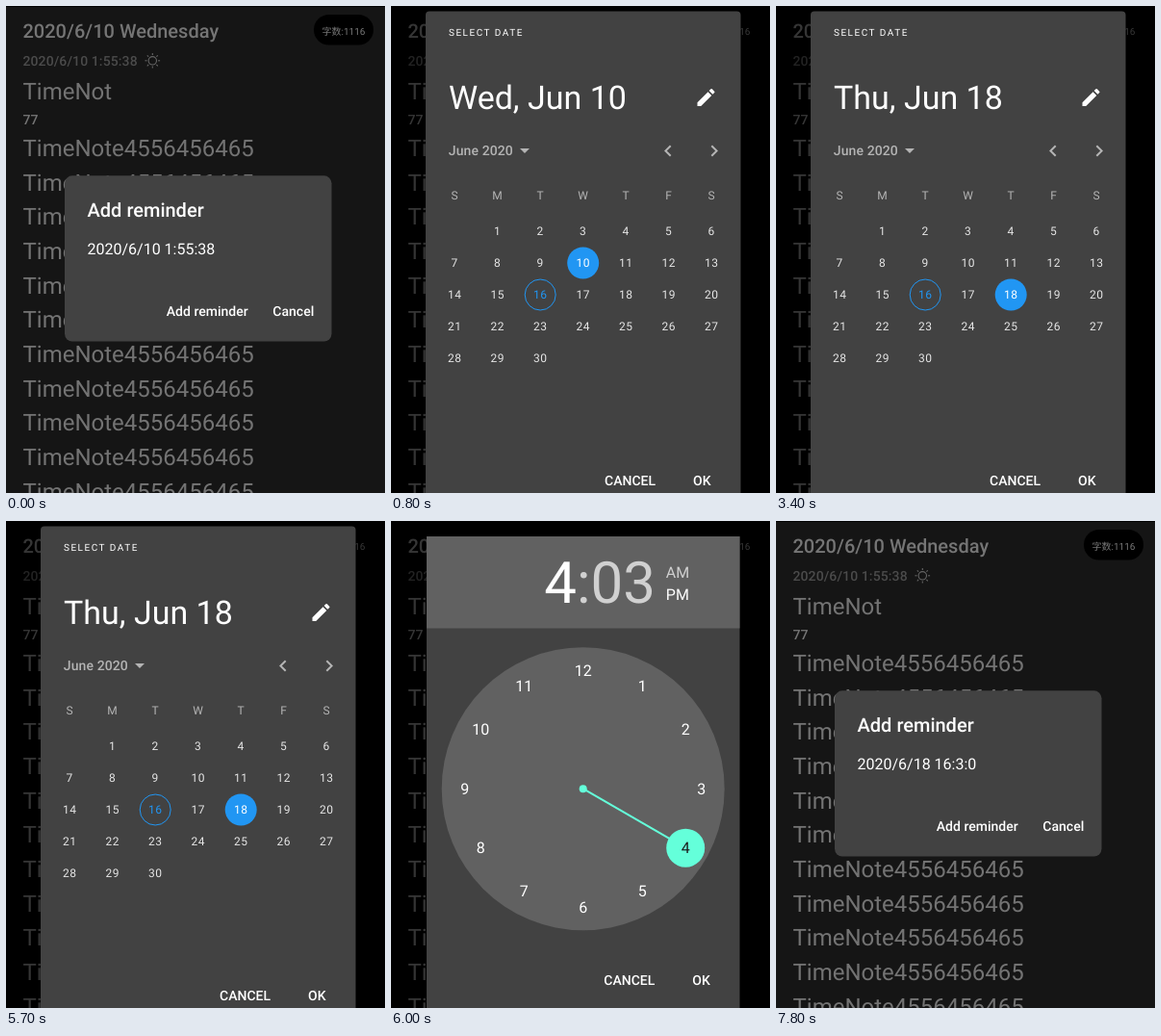
An HTML page for the animation above (8000 ms loop, 394 px wide and 506 px high).

```html
<!DOCTYPE html>
<html lang="en">
<head>
<meta charset="utf-8">
<title>Add reminder</title>
<style>
  html, body { margin: 0; width: 100%; height: 100%; overflow: hidden; background: #000; }
  svg { display: block; width: 394px; height: 506px; }
  text { font-family: Roboto, "Noto Sans CJK SC", "Noto Sans CJK", sans-serif; text-rendering: geometricPrecision; white-space: pre; }
  .m { font-weight: 500; }
  .c { text-anchor: middle; }
</style>
</head>
<body>
<svg id="stage" viewBox="0 0 394 506" xmlns="http://www.w3.org/2000/svg"></svg>
<script>
const LOOP = 8000;
const GREY = '#b4b4b4', DAY = '#e6e6e6', BLUE = '#2196f3', TEAL = '#64ffda', PANEL = '#424242', LIGHT = '#616161';
const stage = document.getElementById('stage');

function add(parent, tag, attrs, content) {
  const node = document.createElementNS('http://www.w3.org/2000/svg', tag);
  for (const key in attrs) node.setAttribute(key, attrs[key]);
  if (content !== undefined) node.textContent = content;
  parent.appendChild(node);
  return node;
}
const group = parent => add(parent, 'g', {});
const rect = (parent, x, y, width, height, fill, rx = 0) =>
  add(parent, 'rect', { x, y, width, height, fill, rx });
const circle = (parent, cx, cy, r, fill, more) =>
  add(parent, 'circle', { cx, cy, r, fill, ...more });
const label = (parent, x, y, size, fill, content, cls = '', spacing = 0) =>
  add(parent, 'text', { x, y, 'font-size': size, fill, class: cls, 'letter-spacing': spacing }, content);
const icon = (parent, x, y, d, fill) =>
  add(parent, 'path', { d, fill, transform: `translate(${x} ${y})` });
const show = (node, on) => node.setAttribute('display', on ? 'inline' : 'none');

// Note page
const page = rect(stage, 0, 0, 394, 506, '#151515');
rect(stage, 0, 0, 394, 1, '#000');
label(stage, 17.5, 33, 20, '#757575', '2020/6/10 Wednesday', 'm');
label(stage, 17.5, 62, 14, '#4b4b4b', '2020/6/10 1:55:38', 'm', 0.1);
const sun = add(stage, 'g', { stroke: '#666', 'stroke-width': 1.1, fill: 'none', transform: 'translate(152.3 56.8)' });
circle(sun, 0, 0, 4.2, 'none');
for (let i = 0; i < 8; i++)
  add(sun, 'line', { x1: 0, y1: -5.8, x2: 0, y2: -7.8, transform: `rotate(${i * 45})` });
rect(stage, 320, 9, 62, 31.5, '#000', 15.75);
label(stage, 328.5, 29.8, 10, '#777', '字数:1116');
label(stage, 17.5, 96.7, 24, '#737373', 'TimeNot');
label(stage, 17.5, 123, 14, '#757575', '77', 'm');
for (let i = 0; i < 11; i++)
  label(stage, 17.5, 155.8 + i * 35.7, 24, '#737373', 'TimeNote4556456465');

// Reminder dialog
rect(stage, 61, 176.3, 277.5, 172.2, PANEL, 8);
label(stage, 84.5, 219, 20, '#fff', 'Add reminder', 'm');
const stamp = label(stage, 84.5, 257.5, 16, '#fff', '');
label(stage, 166.8, 322, 14, '#fff', 'Add reminder', 'm');
label(stage, 277.3, 322, 14, '#fff', 'Cancel', 'm');
const tap = circle(stage, 182, 249, 7, '#fff', { opacity: 0.1 });

const scrim = rect(stage, 0, 0, 394, 506, '#000');
scrim.setAttribute('opacity', 0.54);

// Date picker
const datePicker = group(stage);
rect(datePicker, 36, 5.5, 327.5, 520, PANEL, 4);
label(datePicker, 60, 30.5, 10, '#fff', 'SELECT DATE', '', 1.5);
const headline = label(datePicker, 60, 107, 34, '#fff', '');
icon(datePicker, 315.5, 83, 'M3 17.25V21h3.75L17.81 9.94l-3.75-3.75zM20.71 7.04a1 1 0 0 0 0-1.41l-2.34-2.34a1 1 0 0 0-1.41 0l-1.83 1.83 3.75 3.75z', '#fff');
label(datePicker, 59.8, 155.3, 14, GREY, 'June 2020', 'm', 0.1);
icon(datePicker, 127, 138, 'M7 10l5 5 5-5z', GREY);
icon(datePicker, 276, 138.5, 'M15.41 7.41L14 6l-6 6 6 6 1.41-1.41L10.83 12z', GREY);
icon(datePicker, 324, 138.5, 'M10 6L8.59 7.41 13.17 12l-4.58 4.59L10 18l6-6z', GREY);

const colX = i => 66.2 + i * 44.5;
const dayX = day => colX(day % 7);
const dayY = day => 234 + Math.floor(day / 7) * 33;
[...'SMTWTFS'].forEach((d, i) => label(datePicker, colX(i), 201.3, 12, GREY, d, 'c', 0.4));
const chosen = circle(datePicker, 0, 0, 16.5, BLUE);
circle(datePicker, dayX(16), dayY(16), 16, 'none', { stroke: BLUE, 'stroke-width': 1 });
const days = [];
for (let d = 1; d <= 30; d++)
  days[d] = label(datePicker, dayX(d), dayY(d) + 4.3, 12, DAY, d, 'c', 0.4);
days[16].setAttribute('fill', BLUE);
const dateTap = circle(datePicker, 321, 488.5, 2, '#fff', { opacity: 0.1 });
label(datePicker, 222, 498.3, 14, '#fff', 'CANCEL', 'm');
label(datePicker, 314, 498.3, 14, '#fff', 'OK', 'm');

// Time picker
const timePicker = group(stage);
const CX = 199.7, CY = 278.2, RING = 123;
rect(timePicker, 37, 16, 325.5, 490, PANEL);
rect(timePicker, 37, 16, 325.5, 95.5, LIGHT);
const clock = label(timePicker, 159.3, 85, 60, '#fff', '4');
add(clock, 'tspan', { fill: '#d0d0d0' }, ':03');
label(timePicker, 285.8, 58.6, 16, '#d0d0d0', 'AM');
label(timePicker, 285.8, 81.5, 16, '#fff', 'PM');
circle(timePicker, CX, CY, 147, LIGHT);
const hourAt = h => {
  const a = h * Math.PI / 6;
  return [CX + RING * Math.sin(a), CY - RING * Math.cos(a)];
};
const [hx, hy] = hourAt(4);
circle(timePicker, CX, CY, 4, TEAL);
add(timePicker, 'line', { x1: CX, y1: CY, x2: hx, y2: hy, stroke: TEAL, 'stroke-width': 2 });
circle(timePicker, hx, hy, 20, TEAL);
for (let h = 1; h <= 12; h++) {
  const [x, y] = hourAt(h);
  label(timePicker, x, y + 5.7, 16, h === 4 ? '#1c1c1c' : '#fff', h, 'c');
}
const pressed = rect(timePicker, 291, 459, 63, 35, '#fff', 2);
label(timePicker, 221.3, 482, 14, '#fff', 'CANCEL', 'm');
label(timePicker, 313.3, 482, 14, '#fff', 'OK', 'm');

function select(day, name) {
  headline.textContent = `${name}, Jun ${day}`;
  chosen.setAttribute('cx', dayX(day));
  chosen.setAttribute('cy', dayY(day));
  for (const d of [10, 17, 18]) days[d].setAttribute('fill', d === day ? '#fff' : DAY);
}

function draw(t) {
  const picking = t >= 800 && t < 7800;
  page.setAttribute('fill', picking ? '#000' : '#151515');
  show(scrim, picking);
  stamp.textContent = t < 7600 ? '2020/6/10 1:55:38' : '2020/6/18 16:3:0';
  show(tap, t >= 500 && t < 800);

  show(datePicker, t >= 800 && t < 6000);
  if (t < 2900) select(10, 'Wed');
  else if (t < 3400) select(17, 'Wed');
  else select(18, 'Thu');
  show(dateTap, t >= 5700);
  dateTap.setAttribute('r', t < 5800 ? 2 : 3);

  show(timePicker, t >= 6000 && t < 7800);
  timePicker.setAttribute('opacity', t < 7700 ? 1 : 0.8);
  pressed.setAttribute('opacity', t < 7500 ? 0 : t < 7600 ? 0.03 : 0.06);
}

function tick() {
  draw(performance.now() % LOOP);
  requestAnimationFrame(tick);
}
tick();
</script>
</body>
</html>
```
